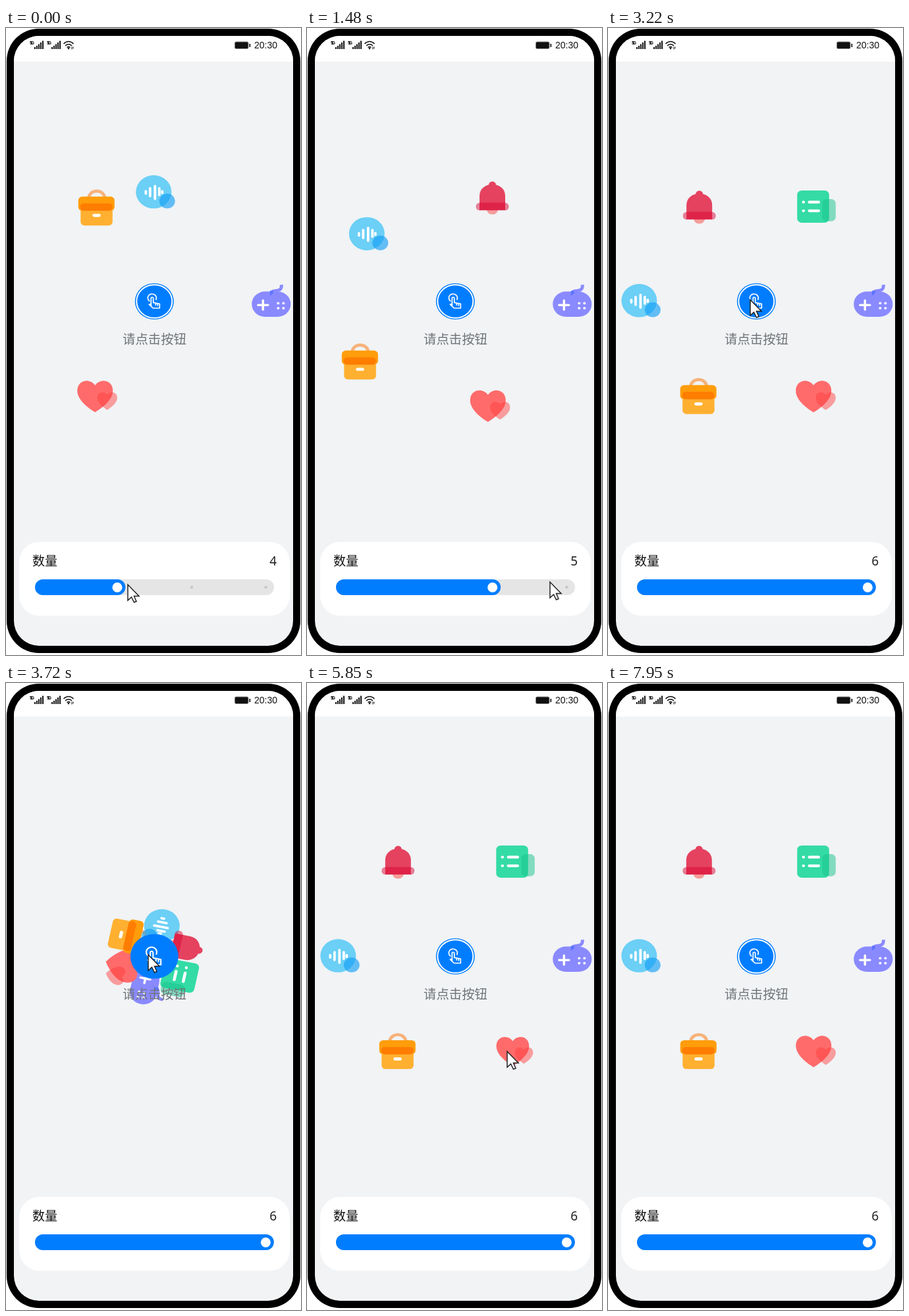
Recreate the animation shown at these times as an HTML page. Size 448 by 953 pixels, loop 8 s.

```html
<!DOCTYPE html>
<html lang="zh">
<head>
<meta charset="utf-8">
<style>
  html, body { margin: 0; height: 100%; overflow: hidden; background: #fff; }
  svg { display: block; width: 100%; height: 100%; }
  text { font-family: "Noto Sans", "Noto Sans CJK SC", "Noto Sans CJK", sans-serif; }
  .status { font: 14px "Liberation Sans", sans-serif; }
  .net { font: bold 7px "Liberation Sans", sans-serif; }
  .line { fill: none; stroke: #fff; stroke-linecap: round; stroke-linejoin: round; }
</style>
</head>
<body>
<svg viewBox="0 0 448 953">
  <defs>
    <clipPath id="screen"><rect x="12" y="12" width="424" height="927" rx="38"/></clipPath>
    <path id="heartShape" d="M0 27C-8 22-27 8-27-8C-27-26-8-29 0-17C8-29 27-26 27-8C27 8 8 22 0 27Z"/>
    <g id="signal">
      <text class="net" y="25" textLength="7">5G</text>
      <path d="M8 32v-3M11 32v-5M14 32v-7.500M17 32v-10M20 32v-12.500" stroke="#111" stroke-width="2"/>
    </g>
  </defs>

  <rect x="1" y="1" width="446" height="949" rx="49"/>
  <g clip-path="url(#screen)">
    <rect width="448" height="953" fill="#f1f3f5"/>
    <rect width="448" height="51" fill="#fff"/>
  </g>

  <use href="#signal" x="36"/>
  <use href="#signal" x="62"/>
  <g fill="none" stroke="#111" stroke-width="1.600">
    <path d="M87.500 24q7.500-7 15 0M90 27q5-4.500 10 0M92.500 29.500q2.500-2 5 0"/>
    <circle cx="95" cy="31" r=".6"/>
    <path d="M100 28.500v4M102 28.500v3" stroke-width="1"/>
  </g>
  <rect x="347.500" y="21" width="20.500" height="10.500" rx="2" fill="#111" stroke="#888"/>
  <rect x="369.500" y="24" width="1.700" height="5" fill="#111"/>
  <text class="status" x="377" y="31" fill="#111">20:30</text>

  <rect x="20" y="781" width="411" height="112.500" rx="31" fill="#fff"/>
  <text x="40" y="817" font-size="19" font-weight="500" fill="#111">数量</text>
  <text id="count" x="411" y="817" font-size="19" font-weight="500" text-anchor="end" fill="#222"></text>
  <rect x="44" y="838" width="363" height="24" rx="12" fill="#e5e5e5"/>
  <g fill="#c8c8c8"><circle cx="282" cy="850" r="2.300"/><circle cx="394.500" cy="850" r="2.300"/></g>
  <rect id="fill" x="44" y="838" height="24" rx="12" fill="#007dff"/>
  <circle id="knob" cy="850.300" r="7.500" fill="#fff"/>

  <g transform="translate(225.300 415.500) scale(1 .935)">
    <g id="ring">
      <g class="icon">
        <path d="M0-11C0-23 17-11 16-27" fill="none" stroke="#8a8aff" stroke-width="5"/>
        <rect x="-29" y="-16" width="59" height="41" rx="20" fill="#8a8aff"/>
        <path d="M-1.500-17h5v4l-5 4z" fill="#5c74ff"/>
        <path d="M-19.500 6h15M-12-1.500v15" class="line" stroke-width="3.500"/>
        <path d="M11 3h.1M19 3h.1M11 11h.1M19 11h.1" class="line" stroke-width="4"/>
      </g>
      <g class="icon">
        <use href="#heartShape" x="-1.500" fill="#ff6b6b"/>
        <use href="#heartShape" transform="translate(17 8) scale(.56)" fill="#ff3c3c" opacity=".48"/>
      </g>
      <g class="icon">
        <path d="M-11-15A12 11 0 0 1 13-15" fill="none" stroke="#f7b27a" stroke-width="5"/>
        <rect x="-27" y="-17" width="55" height="23" rx="6" fill="#ff9d0a"/>
        <rect x="-23.500" y="-6" width="48.500" height="36" rx="6" fill="#ffb031"/>
        <rect x="-24" y="-6" width="49" height="12" rx="5" fill="#ff7d00"/>
        <rect x="-5.500" y="11" width="12.500" height="5" rx="2.500" fill="#fff"/>
      </g>
      <g class="icon">
        <circle cx="-1" cy="-1" r="27" fill="#6bcff6"/>
        <circle cx="19.500" cy="14" r="12" fill="#16a0f5" opacity=".65"/>
        <path d="M-13-2v4M-6.500-7v13M1-10.500v21M7.500-7v11M12-2v3" class="line" stroke-width="3.800"/>
      </g>
      <g class="icon">
        <ellipse cx="1.500" cy="19" rx="8.500" ry="8" fill="#f59c9a"/>
        <circle cx="1.500" cy="-21" r="5.500" fill="#e5425f"/>
        <path d="M-18 20V-3C-18-28 21-28 21-3V20Z" fill="#e5425f"/>
        <rect x="-23.500" y="8" width="50" height="12.500" rx="6" fill="#d8002e" opacity=".48"/>
      </g>
      <g class="icon">
        <rect x="-26.500" y="-27" width="48.500" height="52.500" rx="7" fill="#34dba5"/>
        <rect x="11.500" y="-13" width="20.500" height="36" rx="7" fill="#16c489" opacity=".5"/>
        <path d="M-17-8h.1M-17 6h.1M-8-8H6M-8 6H6" class="line" stroke-width="4.500"/>
      </g>
    </g>
    <g id="button">
      <circle r="29.500" fill="#007dff"/>
      <circle id="halo" r="27" class="line"/>
      <path d="M-7.500-.5A6.500 6.500 0 1 1 2.500-3M-5 8V-5a1.700 1.700 0 0 1 3.400 0V2L8 4V11H-2L-8 5l3-1M2 3v3M5 4v3" class="line" stroke-width="1.700"/>
    </g>
  </g>
  <text x="225.500" y="480" font-size="19.400" text-anchor="middle" fill="#6f7478">请点击按钮</text>
  <path id="cursor" d="M0 0V24L5.500 19L9.500 27L13 25.500L9.500 17.500H17Z" fill="#fff" stroke="#222" stroke-width="1.500"/>
</svg>

<script>
const LOOP = 8000, RADIUS = 177, MOVE = 1000;
const $ = id => document.getElementById(id);
const icons = [...document.querySelectorAll('.icon')];
const clamp = x => Math.min(1, Math.max(0, x));

function bezier(x1, y1, x2, y2) {
  const at = (a, b, u) => 3 * a * u * (1 - u) ** 2 + 3 * b * u * u * (1 - u) + u ** 3;
  return x => {
    if (x <= 0 || x >= 1) return clamp(x);
    let lo = 0, hi = 1;
    for (let i = 0; i < 24; i++) {
      const mid = (lo + hi) / 2;
      if (at(x1, x2, mid) < x) lo = mid; else hi = mid;
    }
    return at(y1, y2, lo);
  };
}
const ease = bezier(.25, .1, .25, 1);
const easeOut = bezier(0, 0, .58, 1);

// Linear interpolation of [time, ...values] keys
function track(keys, t) {
  let i = 0;
  while (i < keys.length - 2 && t >= keys[i + 1][0]) i++;
  const [a, b] = [keys[i], keys[i + 1]];
  const k = clamp((t - a[0]) / (b[0] - a[0]));
  return a.slice(1).map((v, j) => v + (b[j + 1] - v) * k);
}

const cursorKeys = [
  [240, 185, 846], [480, 275, 846], [730, 282, 846], [980, 335, 840], [1230, 361, 842],
  [1480, 369, 842], [2230, 371, 842], [2480, 300, 565], [2730, 235, 450], [2970, 216, 413],
  [3900, 216, 413], [4350, 246, 480], [4720, 248, 498], [4970, 246, 543], [5460, 304, 560],
  [6600, 304, 560], [7100, 340, 700], [7460, 373, 830], [7800, 389, 911]
];
const heartKeys = [
  [5560, 1], [5850, .92], [6300, 1.25], [6600, 1.2], [7450, 1.17], [7900, 1]
];
const moves = [[3, 55], [4, 800], [5, 2290]];   // [count before, start time]

// Place of icon i among n; a newcomer stands at its own place from the start
function slot(i, n) {
  const a = 2 * Math.PI * i / Math.max(n, i + 1);
  return [RADIUS * Math.cos(a), RADIUS * Math.sin(a)];
}

function place(i, t) {
  const pos = slot(i, 3);
  for (const [n, start] of moves) {
    const from = slot(i, n), to = slot(i, n + 1), k = ease((t - start) / MOVE);
    pos.forEach((_, j) => pos[j] += (to[j] - from[j]) * k);
  }
  return pos;
}

function draw(t) {
  const count = t < 725 ? 4 : t < 2230 ? 5 : 6;
  $('count').textContent = count;
  const knob = 169 + 112.7 * (count - 4);
  $('knob').setAttribute('cx', knob);
  $('fill').setAttribute('width', knob + 12.4 - 44);

  // After the tap the icons fold in, then spiral out one full turn
  const spread = t < 3435 ? 1 - clamp((t - 3345) / 90) : easeOut((t - 3435) / 1570);
  const turn = t < 3435 ? 0 : 360 * spread;
  $('ring').setAttribute('transform', `rotate(${turn})`);
  icons.forEach((icon, i) => {
    const [x, y] = place(i, t);
    const size = i === 1 ? track(heartKeys, t)[0] : 1;
    icon.setAttribute('transform', `translate(${x * spread} ${y * spread}) scale(${size})`);
    icon.setAttribute('visibility', i < count ? 'visible' : 'hidden');
  });
  $('button').setAttribute('transform', `scale(${1 + .33 * (1 - spread)})`);
  $('halo').setAttribute('stroke-width', 2 * clamp((spread - .4) / .4));

  const [cx, cy] = track(cursorKeys, t);
  $('cursor').setAttribute('transform', `translate(${cx} ${cy})`);
  $('cursor').setAttribute('visibility', t < 7880 ? 'visible' : 'hidden');
}

const begin = performance.now();
function frame() {
  draw((performance.now() - begin) % LOOP);
  requestAnimationFrame(frame);
}
frame();
</script>
</body>
</html>
```
